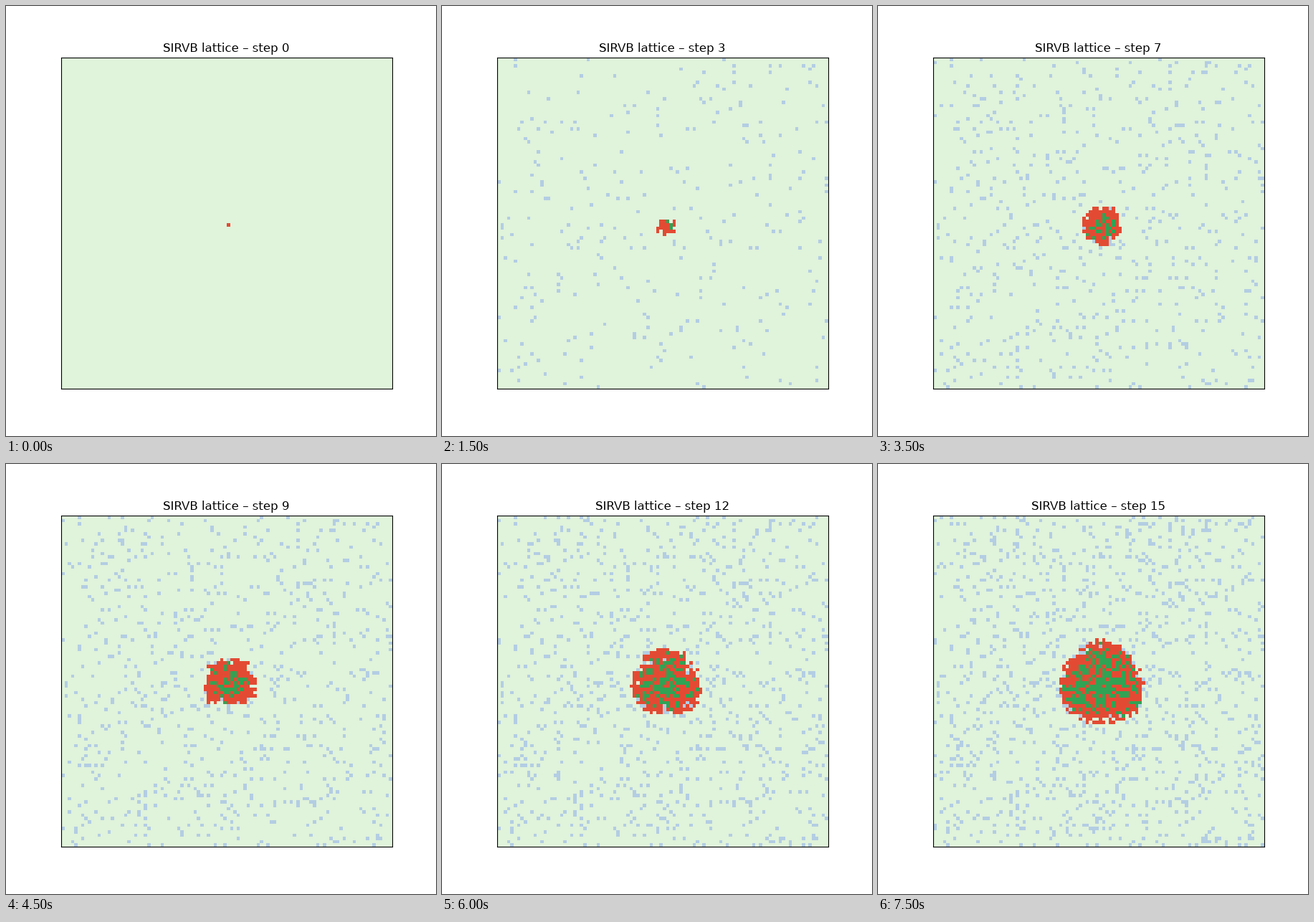
These frames come from a looping animation (600x600 px, 8 s). A matplotlib script:

```python
import numpy as np
import matplotlib.pyplot as plt
from matplotlib.animation import FuncAnimation
from matplotlib.colors import ListedColormap

plt.rcParams["text.hinting"] = "native"

N, STEPS = 100, 16
S, I, R, V = range(4)
COLORS = ["#e0f3db", "#e34a33", "#31a354", "#b3cde3"]
SPEED, RAGGED, LOBES = 0.82, 1.1, 0.06    # spread in cells per step, edge shape
RECOVERY = 0.1
VACC_RATE, VACC_DECAY, VACC_DELAY = 0.0102, 30, 3


def has_neighbour(mask):
    """True where any of the eight surrounding cells is set."""
    p = np.pad(mask, 1)
    return np.any([p[dy:dy + N, dx:dx + N]
                   for dy in range(3) for dx in range(3)
                   if (dy, dx) != (1, 1)], axis=0)


def simulate(seed=7):
    rng = np.random.default_rng(seed)
    y, x = np.mgrid[:N, :N]
    dx, dy = x - 50.4, y - 50.2
    # The front runs a little faster in three directions, one of them up.
    pace = SPEED * (1 + LOBES * np.cos(3 * np.arctan2(dx, -dy)))
    arrival = (np.hypot(dx, dy) / pace - 0.4
               + RAGGED * rng.standard_normal((N, N)))
    luck = rng.random((N, N))

    grid = np.full((N, N), S)
    grid[N // 2, N // 2] = I
    history = [grid]
    for t in range(1, STEPS):
        new = grid.copy()
        sick = grid == I
        new[sick & (rng.random((N, N)) < RECOVERY)] = R
        covered = VACC_RATE * VACC_DECAY * (1 - np.exp(-t / VACC_DECAY))
        new[(grid == S) & (luck < covered)] = V
        # Vaccination only delays infection.
        due = arrival + VACC_DELAY * (grid == V) <= t
        open_cells = (grid == S) | (grid == V)
        new[open_cells & due & has_neighbour(sick | (grid == R))] = I
        grid = new
        history.append(grid)
    return history


history = simulate()

fig, ax = plt.subplots(figsize=(6, 6), dpi=100)
image = ax.imshow(history[0], cmap=ListedColormap(COLORS), vmin=S, vmax=V,
                  interpolation="nearest")
ax.set(xticks=[], yticks=[])
title = ax.set_title("")


def draw(step):
    image.set_data(history[step])
    title.set_text(f"SIRVB lattice – step {step}")
    return image, title


anim = FuncAnimation(fig, draw, frames=STEPS, interval=500, repeat=True,
                     repeat_delay=0, blit=False)
plt.show()
```
